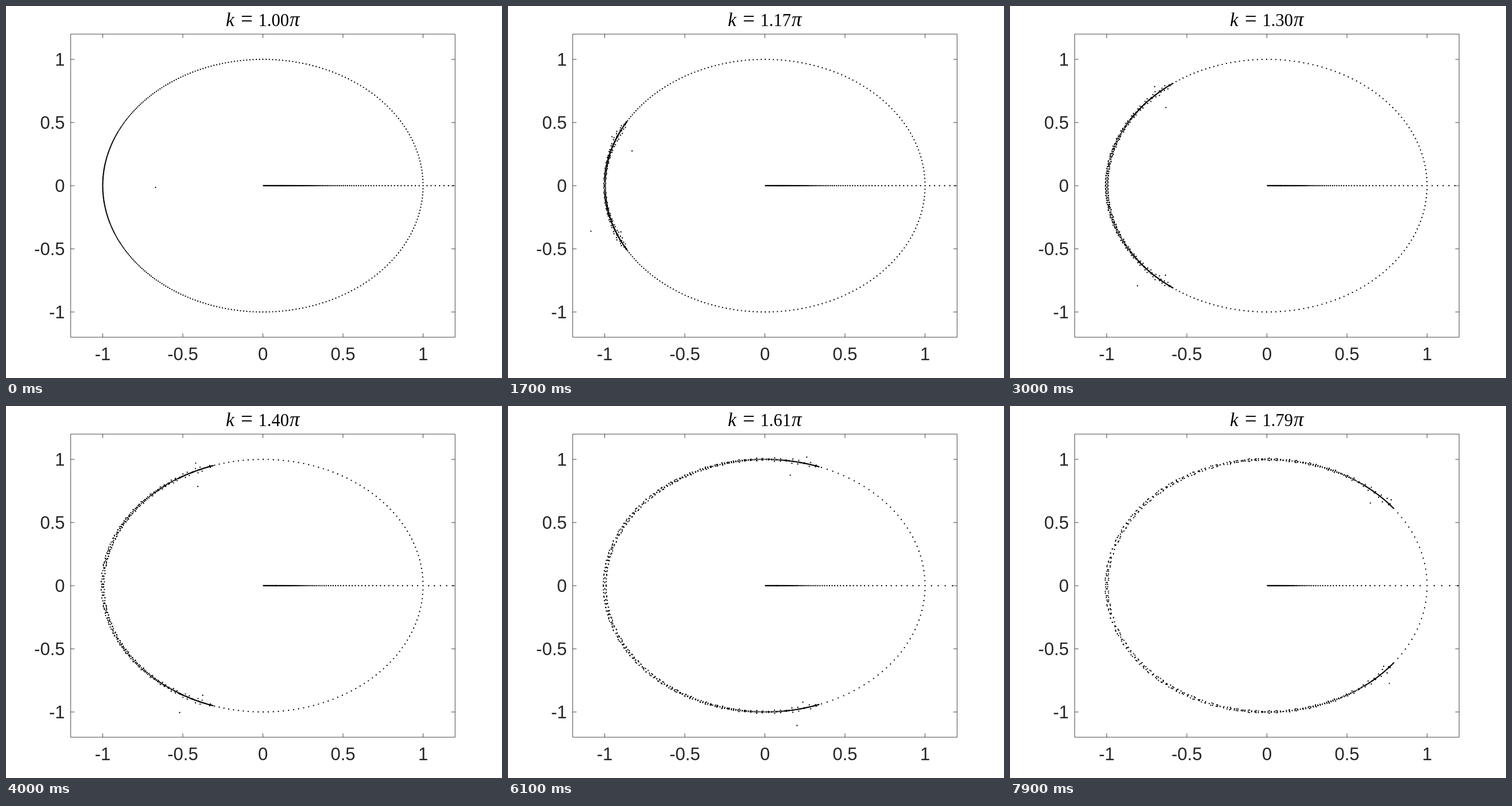
Animation, 864 px wide and 648 px high, one loop 8 s. Source, as an HTML page:

```html
<!DOCTYPE html>
<html lang="en">
<head>
<meta charset="utf-8">
<title>Multipliers in the complex plane</title>
<style>
  html, body { margin: 0; width: 100%; height: 100%; overflow: hidden; background: #fff; }
  svg { display: block; width: 864px; height: 648px; }
  .axes { fill: none; stroke: #262626; stroke-width: .85; }
  .labels { font: 31px "Liberation Sans", Arial, sans-serif; fill: #262626; }
  .title { font: 30.5px "Liberation Serif", Times, serif; fill: #000; }
  #dots { fill: none; stroke: #000; stroke-width: 2.3; stroke-linecap: round; }
</style>
</head>
<body>
<svg viewBox="0 0 864 648">
  <clipPath id="plot"><rect x="112" y="48" width="671" height="530"/></clipPath>
  <path id="axes" class="axes"/>
  <g id="labels" class="labels"></g>
  <g class="title">
    <text x="383" y="34.5" font-style="italic" font-size="33">k</text>
    <text x="409" y="34.5" font-size="37">=</text>
    <text id="value" x="439.5" y="34.5"></text>
    <text x="494" y="34.5" font-style="italic" font-size="35">π</text>
  </g>
  <path id="dots" clip-path="url(#plot)"/>
</svg>
<script>
const byId = id => document.getElementById(id);
const px = x => 447.5 + 279 * x;
const py = y => 313 - 220 * y;
const STEP = 1 / 128, COUNT = 256;

// Stray points: distance from the arc end (units of pi) and log radius, by k / pi.
const KNOTS = [1, 1.1, 1.17, 1.3, 1.4, 1.51, 1.61, 1.79];
const STRAYS = [
  { gap: [.007, .05, .068, .053, .052, .053, .053, .042],
    log: [.4, .18, .135, .124, .123, .122, .1177, .0845] },
  { gap: [0, .03, .047, .032, .03, .03, .03, .019],
    log: [0, -.015, -.03, -.0505, -.0555, -.0555, -.049, -.031] }
];

// Rotation rates: evenly spaced near 0, crowding towards 1.
const slope = f => Math.max(0, 1 - f * f) ** .65;
const rates = [0];
for (let j = 1; j <= COUNT; j++) {
  const f = rates[j - 1];
  rates.push(Math.min(1, f + STEP * slope(f + STEP * slope(f) / 2)));
}

function lerpKnots(values, x) {
  let i = 0;
  while (i < KNOTS.length - 2 && x > KNOTS[i + 1]) i++;
  const u = (x - KNOTS[i]) / (KNOTS[i + 1] - KNOTS[i]);
  return values[i] + u * (values[i + 1] - values[i]);
}

function drawAxes() {
  const left = px(-1.2), right = px(1.2), top = py(1.2), bottom = py(-1.2), tick = 6.7;
  let d = `M${left} ${top}H${right}V${bottom}H${left}Z`;
  let text = "";
  for (const v of [-1, -.5, 0, .5, 1]) {
    const x = px(v), y = py(v);
    d += `M${x} ${bottom}v${-tick}M${x} ${top}v${tick}`;
    d += `M${left} ${y}h${tick}M${right} ${y}h${-tick}`;
    text += `<text x="${x}" y="616.5" text-anchor="middle">${v}</text>`;
    text += `<text x="102.5" y="${y + 11}" text-anchor="end">${v}</text>`;
  }
  byId("axes").setAttribute("d", d);
  byId("labels").innerHTML = text;
}

function dotsPath(ratio) {
  const k = ratio * Math.PI, overlap = 2 * Math.PI - k;
  const taken = new Set();
  let d = "";
  const dot = (x, y) => {
    if (Math.abs(x) > 1.2 || Math.abs(y) > 1.2) return;
    const at = `M${px(x).toFixed(1)} ${py(y).toFixed(1)}h0`;
    const cell = `${Math.round(px(x))},${Math.round(py(y))}`;
    if (taken.has(cell)) return;
    taken.add(cell);
    d += at;
  };
  // A multiplier and its reciprocal.
  const pair = (log, angle) => {
    for (const s of [1, -1]) {
      const r = Math.exp(s * log);
      dot(r * Math.cos(angle), s * r * Math.sin(angle));
    }
  };

  for (let j = 0; j <= COUNT; j++) pair(k * j * STEP, 0);

  rates.forEach((f, j) => {
    const angle = k * f, depth = angle - overlap;
    if (depth <= 0) return pair(0, angle);
    const spread = .01 * Math.min(1, depth / .1) + .4 * depth * Math.exp(-depth / .08);
    const log = spread * Math.min(1, 2 * (1 - f * f)) * Math.sin(2.13 * j);
    pair(log, angle);
    pair(-log, angle);
  });

  for (const s of STRAYS)
    pair(-lerpKnots(s.log, ratio), -(k - lerpKnots(s.gap, ratio) * Math.PI));
  return d;
}

let shown = -1;
function render(ms) {
  const step = Math.floor(ms / 100) % 80;
  if (step === shown) return;
  shown = step;
  const ratio = 1 + step / 100;
  byId("value").textContent = ratio.toFixed(2);
  byId("dots").setAttribute("d", dotsPath(ratio));
}

drawAxes();
render(0);
const start = performance.now();
(function tick() {
  render(performance.now() - start);
  requestAnimationFrame(tick);
})();
</script>
</body>
</html>
```
